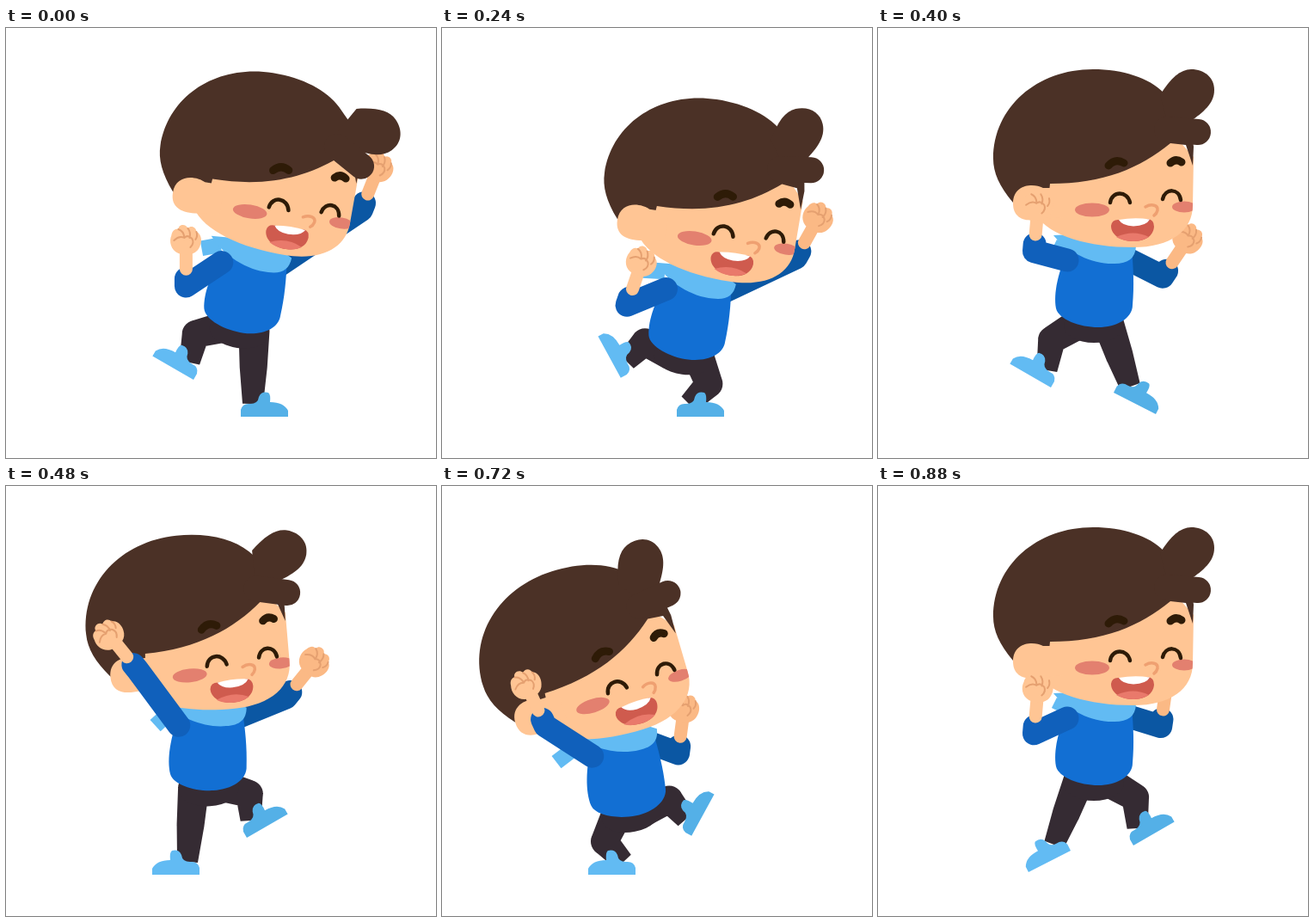
An HTML page for the animation above (0.96 s loop, 500 px wide and 500 px high).

```html
<!DOCTYPE html>
<html lang="en">
<head>
<meta charset="utf-8">
<title>Dancing boy</title>
<style>
  html, body { margin: 0; width: 100%; height: 100%; overflow: hidden; background: #fff; }
  svg { display: block; width: 100%; height: 100%; }
  .line { fill: none; stroke-linecap: round; stroke-linejoin: round; }
  .ink { stroke: #2e1b07; }
  .crease { stroke: #e5a070; stroke-width: 2; }
  .pants { fill: #352b33; }
</style>
</head>
<body>
<svg viewBox="0 0 500 500">
  <defs>
    <path id="face" d="M184,175V218C200,242 245,255 297,255C340,255 366,236 366,206L367,150L340,120H200Z"/>
    <clipPath id="inFace"><use href="#face"/></clipPath>
    <path id="shoe" d="M0,0V-8Q2,-16 11,-15Q20,-15 21,-23Q24,-30 32,-28Q35,-26 34,-17Q50,-17 55,-7V0Z"/>
    <g id="fist">
      <path d="M-9,14C-18,10 -20,0 -17,-7C-16,-13 -12,-15 -9,-14C-9,-20 0,-21 2,-15C6,-19 12,-16 12,-11C18,-9 19,0 16,6C13,14 4,18 -9,14Z"/>
      <path class="line crease" d="M-9,-14Q-3,-12 -2,-5M2,-15Q6,-10 4,-4M-14,-1Q-8,-7 -2,-4Q2,-8 7,-3Q10,2 5,7M12,-11Q14,-6 11,-2"/>
    </g>
  </defs>

  <g id="farArm">
    <path class="line sleeve" stroke="#0b57a3" stroke-width="27"/>
    <path class="line wrist" stroke="#fbb985" stroke-width="15"/>
    <use class="hand" href="#fist" fill="#fbb985"/>
  </g>
  <g id="farLeg">
    <path class="pants"/>
    <use class="foot" href="#shoe" fill="#54b0e7"/>
  </g>
  <g id="nearLeg">
    <path class="pants"/>
    <use class="foot" href="#shoe" fill="#62bbf3"/>
  </g>

  <path id="tail" stroke="#62bbf3" stroke-width="18"/>
  <g id="torso">
    <ellipse class="pants" cy="46" rx="35" ry="20"/>
    <path fill="#126fd3" d="M-28,-48C-42,-15 -47,8 -44,26C-41,39 -16,48 5,48C26,48 45,38 45,22C47,0 46,-20 44,-44Z"/>
    <path fill="#62bbf3" d="M-47,-59C-30,-38 0,-25 24,-26C40,-26 48,-32 49,-46L20,-62Z"/>
  </g>

  <g id="head">
    <use href="#face" fill="#ffc594"/>
    <path fill="#4b3126" d="M157,203C141,184 134,168 134,152C134,92 185,48 250,48C285,48 315,58 332,75L362,106L367,138L366,160L358,136L340,134C305,163 262,181 200,181L199,191L186,184L175,205Z"/>
    <path id="tuft" fill="#4b3126" d="M328,78C340,58 352,48 364,48C380,48 391,58 391,72C391,88 378,98 364,108L340,122Z"/>
    <path id="bump" class="line" stroke="#4b3126" stroke-width="30" d="M336,118L372,121"/>
    <path fill="#ffc594" d="M192,186C180,180 157,182 157,204C157,222 172,226 190,223L215,220V186Z"/>
    <g clip-path="url(#inFace)" fill="#e3806f">
      <ellipse cx="249" cy="211.500" rx="20" ry="8"/>
      <ellipse cx="356" cy="208" rx="14" ry="6.500"/>
    </g>
    <path class="line ink" stroke-width="4.500" d="M270,203C272,189 290,189 293,203M331,199C334,186 350,186 352,200"/>
    <path class="line ink" stroke-width="9" d="M268,160Q276,151 286,157M340,157Q346,151 353,156"/>
    <path class="line" stroke="#efa071" stroke-width="3.500" d="M311,208C318,204 326,206 325,212Q324,216 321,218"/>
    <path fill="#cf5b4e" d="M271,230Q272,222 281,223Q298,225 314,222Q321,223 321,231C320,243 309,248 297,248C283,248 271,241 271,230Z"/>
    <path fill="#e9796b" d="M277,243Q297,234 315,243Q307,248 297,248Q285,248 277,243Z"/>
    <path fill="#fff" d="M280,223Q298,220 316,222.500Q312,230 297,230.500Q284,230 280,223Z"/>
  </g>

  <g id="nearArm">
    <path class="line sleeve" stroke="#1060bb" stroke-width="27"/>
    <path class="line wrist" stroke="#ffc594" stroke-width="15"/>
    <use class="hand" href="#fist" fill="#ffc594"/>
  </g>
</svg>
<script>
const LOOP = 960, BEAT = 80;
const FOREARM = 52, HALF_LEG = 36;

const $ = id => document.getElementById(id);
const mix = (a, b, k) => a + (b - a) * k;
const mixAll = (p, q, k) => p.map((v, i) => mix(v, q[i], k));
const set = (el, name, value) => el.setAttribute(name, value);
const line = (...pts) => 'M' + pts.map(p => p[0].toFixed(2) + ',' + p[1].toFixed(2)).join('L');

// Point (x, y) of a part placed at [px, py] and turned by deg
function place([px, py, deg], x, y) {
  const r = deg * Math.PI / 180, c = Math.cos(r), s = Math.sin(r);
  return [px + x * c - y * s, py + x * s + y * c];
}

// Sway is a sine, bob its absolute value; the rest skew and sharpen the swing
function wave(a, base, sway, bob = 0, skew = 0, cos = 0, third = 0, fourth = 0) {
  const s = Math.sin(a);
  return base + sway * s + bob * Math.abs(s) + skew * Math.sin(2 * a)
    + cos * Math.cos(a) + third * Math.sin(3 * a) + fourth * Math.sin(4 * a);
}

// Heel and tilt of the right foot over its own 12 beats: stand, push off, swing
function foot(p) {
  const stand = [273, 452, 0], push = [274, 424, 27];
  const swing = u => {
    const arc = Math.sin(Math.PI * u);
    return [280 + 17 * u, 409 - 8 * arc + 9 * u, -30 - 33 * arc];
  };
  if (p < 5) return stand;
  if (p < 6) return mixAll(push, swing(0), p - 5);
  if (p < 11) return swing((p - 6) / 5);
  return mixAll(swing(1), stand, p - 11);
}

function drawArm(id, shoulder, x, y, turn) {
  const g = $(id), elbow = place([x, y, turn], 0, FOREARM);
  const along = k => mixAll(elbow, [x, y], k);
  set(g.querySelector('.sleeve'), 'd', line(shoulder, elbow, along(0.16)));
  set(g.querySelector('.wrist'), 'd', line(along(0.38), along(0.85)));
  set(g.querySelector('.hand'), 'transform', `translate(${x} ${y}) rotate(${turn})`);
}

// Bone from point p (radius r) to q (radius t), with a round end at p
function bone(p, r, q, t) {
  const dx = q[0] - p[0], dy = q[1] - p[1], d = Math.hypot(dx, dy);
  const side = (o, k) => [o[0] - dy / d * k, o[1] + dx / d * k];
  return line(side(p, r), side(q, t), side(q, -t), side(p, -r)) + 'Z'
    + `M${p[0] - r},${p[1]}a${r},${r} 0 1 0 ${2 * r},0a${r},${r} 0 1 0 ${-2 * r},0Z`;
}

function drawLeg(id, hip, [x, y, tilt], side) {
  const g = $(id), ankle = place([x, y, tilt], 14 * side, -15);
  const dx = ankle[0] - hip[0], dy = ankle[1] - hip[1], d = Math.hypot(dx, dy);
  const bend = side * Math.min(18, Math.sqrt(Math.max(0, HALF_LEG ** 2 - d * d / 4)));
  const knee = [hip[0] + dx / 2 + dy / d * bend, hip[1] + dy / 2 - dx / d * bend];
  set(g.querySelector('.pants'), 'd', bone(hip, 18, knee, 16) + bone(knee, 16, ankle, 12));
  set(g.querySelector('.foot'), 'transform', `translate(${x} ${y}) rotate(${tilt}) scale(${side} 1)`);
}

function draw(pos) {
  const a = (pos + 1) * Math.PI / 6, w = (...k) => wave(a, ...k);

  const swing = w(0, 0, -8, 28, 0, 15, 12);
  const head = `translate(${w(311.5, 73.5, -13, 7)} ${w(196, 9.5, 30.5, -9.2)}) rotate(${w(0, 15, -2, 3)})`;
  set($('head'), 'transform', head + ' translate(-311.5 -196)');
  set($('tuft'), 'transform', `rotate(${swing} 345 105)`);
  set($('bump'), 'transform', `rotate(${swing * 0.55} 330 122)`);

  const torso = [w(251, 44, 2, 4), w(300, 0, 32, -11), w(0, 11, 0, 2.5)];
  set($('torso'), 'transform', `translate(${torso[0]} ${torso[1]}) rotate(${torso[2]})`);
  const knot = place(torso, -35, -50);
  set($('tail'), 'd', line(knot, [knot[0] + w(-6, 0, -32), knot[1] + w(12, -16)]));

  drawArm('nearArm', place(torso, -31, -30),
    torso[0] + w(-65, 33, -20, -8, 0, 6, -10),
    torso[1] + w(-78, 32, -18, -10, 14, 9),
    w(5, 25, -11, -12, 0, 7, -10));
  drawArm('farArm', place(torso, 34, -34),
    torso[0] + w(97, 39, 22, 22, -12, 6, 15),
    torso[1] + w(-63, -27, -35, -22, -9, 0, -26),
    w(21, 5, 5, 8, -13));

  // The left foot mirrors the right one half a loop later
  const [x, y, tilt] = foot((pos + 6) % 12);
  drawLeg('nearLeg', place(torso, -18, 44), [498 - x, y, -tilt], -1);
  drawLeg('farLeg', place(torso, 17, 44), foot(pos), 1);
}

// Poses hold for a beat; the third and sixth beats have a half step
function step(ms) {
  const t = ms % LOOP, i = Math.floor(t / BEAT);
  const half = (i === 2 || i === 5) && t % BEAT >= BEAT / 2;
  return i + (half ? 0.5 : 0);
}

function tick() {
  draw(step(performance.now()));
  requestAnimationFrame(tick);
}
tick();
</script>
</body>
</html>
```
